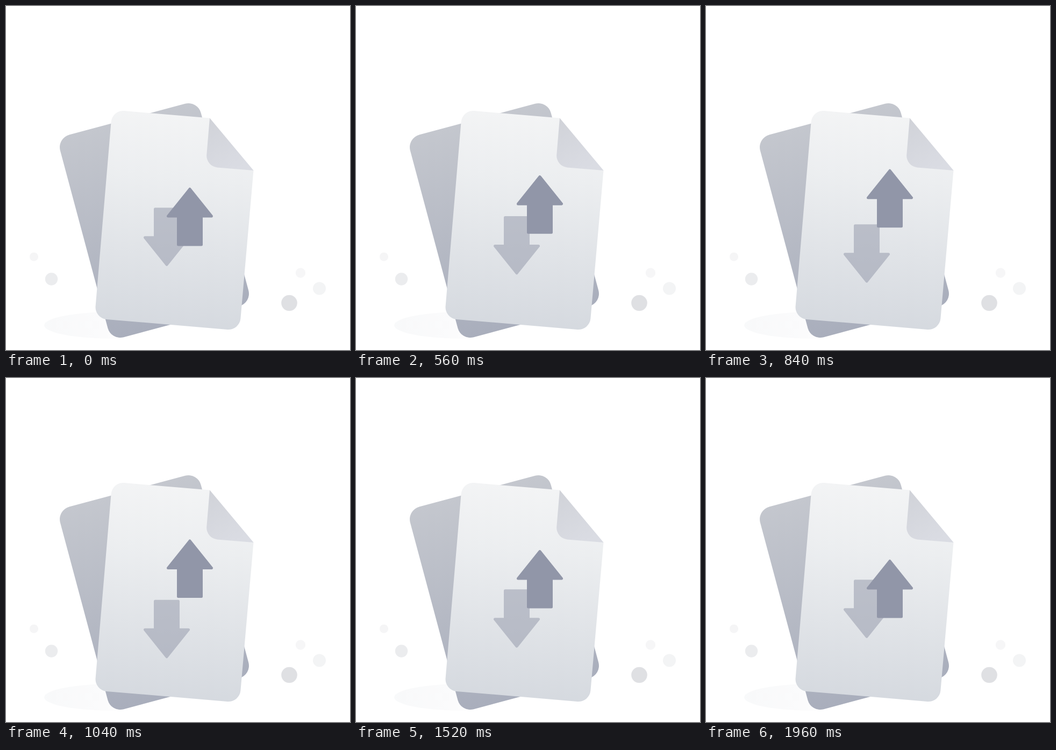
An HTML page for the animation above (2000 ms loop, 640 by 640 pixels).

```html
<!DOCTYPE html>
<html lang="en">
<head>
<meta charset="utf-8">
<title>File transfer</title>
<style>
  html, body { margin: 0; width: 100%; height: 100%; overflow: hidden; background: #fff; }
  svg { display: block; width: 100%; height: 100%; }
</style>
</head>
<body>
<svg viewBox="0 0 640 640">
  <defs>
    <linearGradient id="back" x1="0" y1="0" x2="0" y2="1">
      <stop offset="0" stop-color="#c4c7ce"/>
      <stop offset="1" stop-color="#a9aebc"/>
    </linearGradient>
    <linearGradient id="front" gradientUnits="userSpaceOnUse" x1="330" y1="200" x2="300" y2="600">
      <stop offset="0" stop-color="#f3f4f5"/>
      <stop offset=".3" stop-color="#eceef0"/>
      <stop offset="1" stop-color="#d5d9df"/>
    </linearGradient>
    <linearGradient id="fold" gradientUnits="userSpaceOnUse" x1="378" y1="215" x2="425" y2="306">
      <stop offset="0" stop-color="#d1d3d9"/>
      <stop offset="1" stop-color="#dadce3"/>
    </linearGradient>
    <linearGradient id="shadow" gradientUnits="userSpaceOnUse" x1="72" y1="0" x2="215" y2="0">
      <stop offset="0" stop-color="#f8f9fa"/>
      <stop offset=".8" stop-color="#fbfbfc"/>
      <stop offset="1" stop-color="#fff"/>
    </linearGradient>
    <!-- Tip at the origin, pointing up -->
    <path id="arrow" d="M0 2.5L40.5 53H21.5V106H-21.5V53H-40.5Z"
          fill="#9196a8" stroke="#9196a8" stroke-width="5" stroke-linejoin="round"/>
  </defs>

  <ellipse cx="201" cy="594" rx="130" ry="25" fill="url(#shadow)"/>
  <circle cx="52" cy="466.5" r="8" fill="#f5f5f6"/>
  <circle cx="84.5" cy="508" r="11.7" fill="#ebecee"/>
  <circle cx="548" cy="496.5" r="9.2" fill="#f6f6f7"/>
  <circle cx="583" cy="525.5" r="12" fill="#f3f4f5"/>
  <circle cx="527" cy="552.5" r="14.8" fill="#dfe0e3"/>

  <rect x="-135.5" y="-195" width="271" height="390" rx="24"
        transform="translate(276 399) rotate(-15)" fill="url(#back)"/>
  <path d="M219.9 195.1L379 208.5L460.5 306L436.4 581.4A22.5 22.5 0 0 1 412.1 601.9L187.1 582.9A22.5 22.5 0 0 1 166.6 558.6L195.6 215.6A22.5 22.5 0 0 1 219.9 195.1Z"
        fill="url(#front)"/>
  <path d="M379 208.5L373.3 276.5A22 22 0 0 0 393.4 300.4L460.5 306Z" fill="url(#fold)"/>

  <g id="down" opacity=".5"><use href="#arrow"/></g>
  <g id="up"><use href="#arrow"/></g>
</svg>
<script>
  const LOOP = 2000, STEP = 40, TRAVEL = 40;
  const HALF = (LOOP - STEP) / 2;
  const up = document.getElementById('up');
  const down = document.getElementById('down');

  // Bezier (0.42, 0, 1, 1), solved by bisection
  function easeIn(x) {
    let lo = 0, hi = 1;
    for (let i = 0; i < 24; i++) {
      const s = (lo + hi) / 2, r = 1 - s;
      if (1.26 * r * r * s + 3 * r * s * s + s ** 3 < x) lo = s; else hi = s;
    }
    return 3 * (1 - lo) * lo * lo + lo ** 3;
  }

  function draw(ms) {
    const t = Math.floor((ms % LOOP) / STEP) * STEP;
    const outward = t < HALF;
    const rise = outward ? t / HALF : 2 - t / HALF;
    const drop = outward ? easeIn(rise) : rise;
    up.setAttribute('transform', `translate(342 ${338 - TRAVEL * rise})`);
    down.setAttribute('transform', `translate(299 ${483.7 + TRAVEL * drop}) scale(1 -1)`);
  }

  let start;
  function frame(now) {
    start ??= now;
    draw(now - start);
    requestAnimationFrame(frame);
  }
  draw(0);
  requestAnimationFrame(frame);
</script>
</body>
</html>
```
